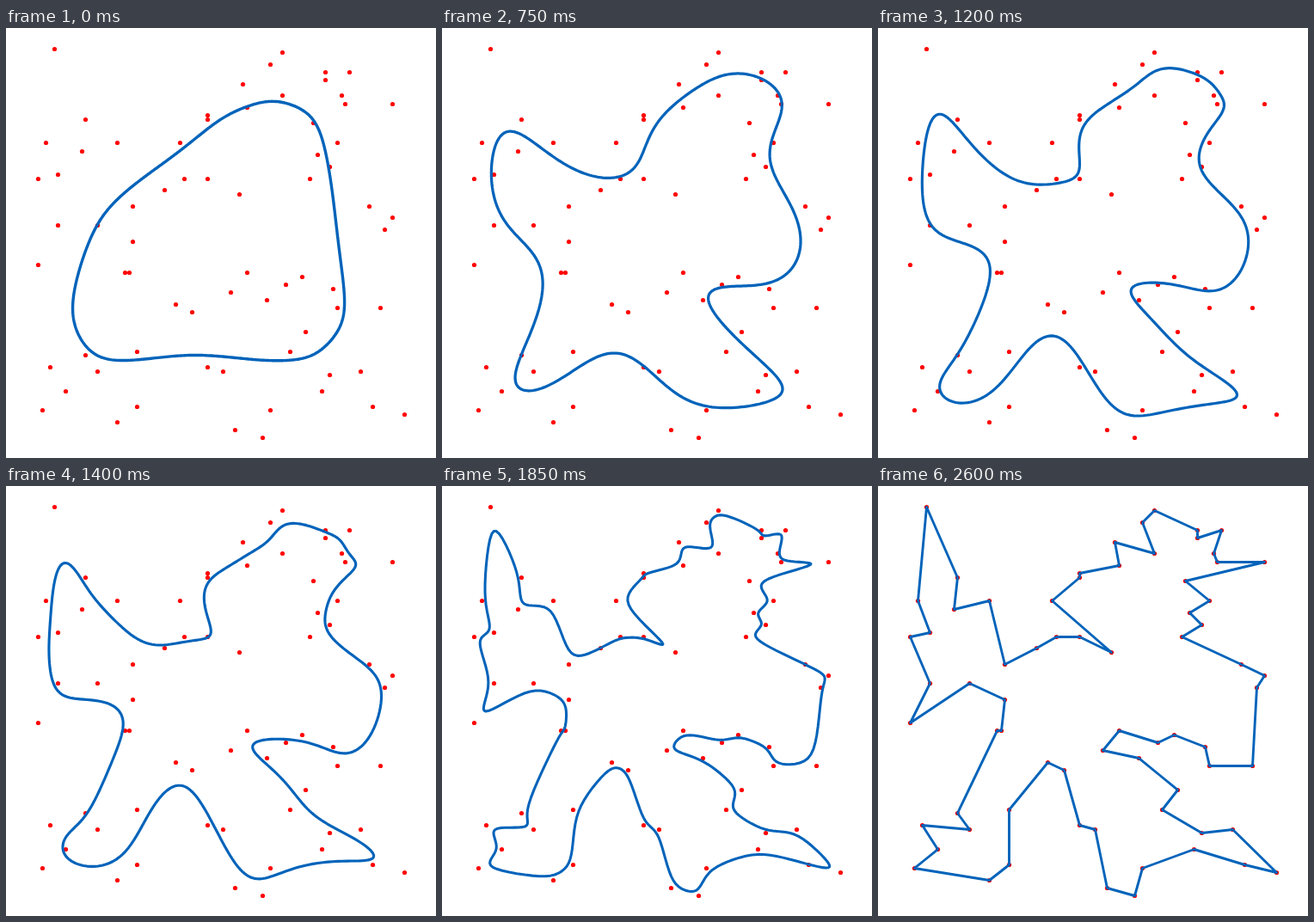
Write an HTML page with a canvas that moves like this. It is 500 px wide and 500 px high and loops after 3600 ms.

```html
<!DOCTYPE html>
<html lang="en">
<head>
<meta charset="utf-8">
<title>Elastic route</title>
<style>
html, body { margin: 0; width: 100%; height: 100%; overflow: hidden; background: #fff; }
canvas { display: block; width: 500px; height: 500px; }
</style>
</head>
<body>
<canvas id="stage" width="500" height="500"></canvas>
<script>
const ctx = document.getElementById('stage').getContext('2d');
const LOOP = 3600, STEP = 50, LAST = 52, SETTLE = 15, NODES = 560;

const pairs = list => Array.from({ length: list.length / 2 }, (_, i) => list.slice(2 * i, 2 * i + 2));
const mix = (a, b, t) => a + (b - a) * t;

// Cities in the order of the finished route
const cities = pairs([
  56,24, 92,106, 88,143, 129,133, 147,207, 184,188, 207,175, 234,175, 271,193, 202,133,
  234,106, 234,101, 280,92, 275,65, 321,78, 307,42, 321,28, 371,51, 371,60, 399,51,
  390,78, 394,88, 449,88, 357,110, 385,133, 362,147, 376,161, 353,175, 422,207, 449,220,
  440,234, 435,325, 385,325, 380,303, 344,289, 325,298, 280,284, 261,307, 303,316, 348,353,
  330,376, 376,403, 412,399, 463,449, 426,440, 367,422, 307,444, 298,476, 266,467, 252,399,
  234,394, 216,330, 197,321, 152,376, 152,440, 129,458, 42,444, 69,422, 51,394, 106,399,
  92,380, 138,284, 143,284, 147,248, 106,229, 37,275, 60,229, 37,175, 60,170, 46,133
]);

// Control points of the loose starting loop
const loop = pairs([
  103,217, 155,176, 205,141, 252,100, 309,78, 365,98, 379,185,
  387,263, 400,342, 358,388, 293,387, 212,375, 102,397, 65,334
]);

// Closed net whose nodes are Gaussian averages of the points around them
function relax(points, sigma) {
  const n = points.length, reach = Math.ceil(4 * sigma) + 1;
  return Array.from({ length: NODES }, (_, k) => {
    const u = k * n / NODES, mid = Math.round(u);
    let x = 0, y = 0, sum = 0;
    for (let i = mid - reach; i <= mid + reach; i++) {
      const w = Math.exp(-((u - i) ** 2) / (2 * sigma * sigma));
      const p = points[(i + n) % n];
      x += w * p[0];
      y += w * p[1];
      sum += w;
    }
    return [x / sum, y / sum];
  });
}

const start = relax(loop, 0.58);

// The neighbourhood shrinks until every city holds its own nodes
function netAt(step) {
  const sigma = Math.max(0.12, 3.2 * (1 - step / LAST) ** 1.4);
  const blend = Math.min(1, step / SETTLE);
  return relax(cities, sigma).map(([x, y], k) =>
    [mix(start[k][0], x, blend), mix(start[k][1], y, blend)]);
}

function draw(step) {
  ctx.fillStyle = '#fff';
  ctx.fillRect(0, 0, 500, 500);
  ctx.fillStyle = '#f00';
  for (const [x, y] of cities) {
    ctx.beginPath();
    ctx.arc(x + 0.5, y + 0.5, 2.6, 0, 2 * Math.PI);
    ctx.fill();
  }
  ctx.beginPath();
  for (const [x, y] of netAt(step)) ctx.lineTo(x + 0.5, y + 0.5);
  ctx.closePath();
  ctx.strokeStyle = '#0063ba';
  ctx.lineWidth = mix(3.4, 2.9, step / LAST);
  ctx.lineJoin = 'round';
  ctx.stroke();
}

const begun = performance.now();
let shown = -1;
function tick() {
  const t = (performance.now() - begun) % LOOP;
  const step = Math.min(LAST, Math.floor(t / STEP));
  if (step !== shown) draw(shown = step);
  requestAnimationFrame(tick);
}
tick();
</script>
</body>
</html>
```
